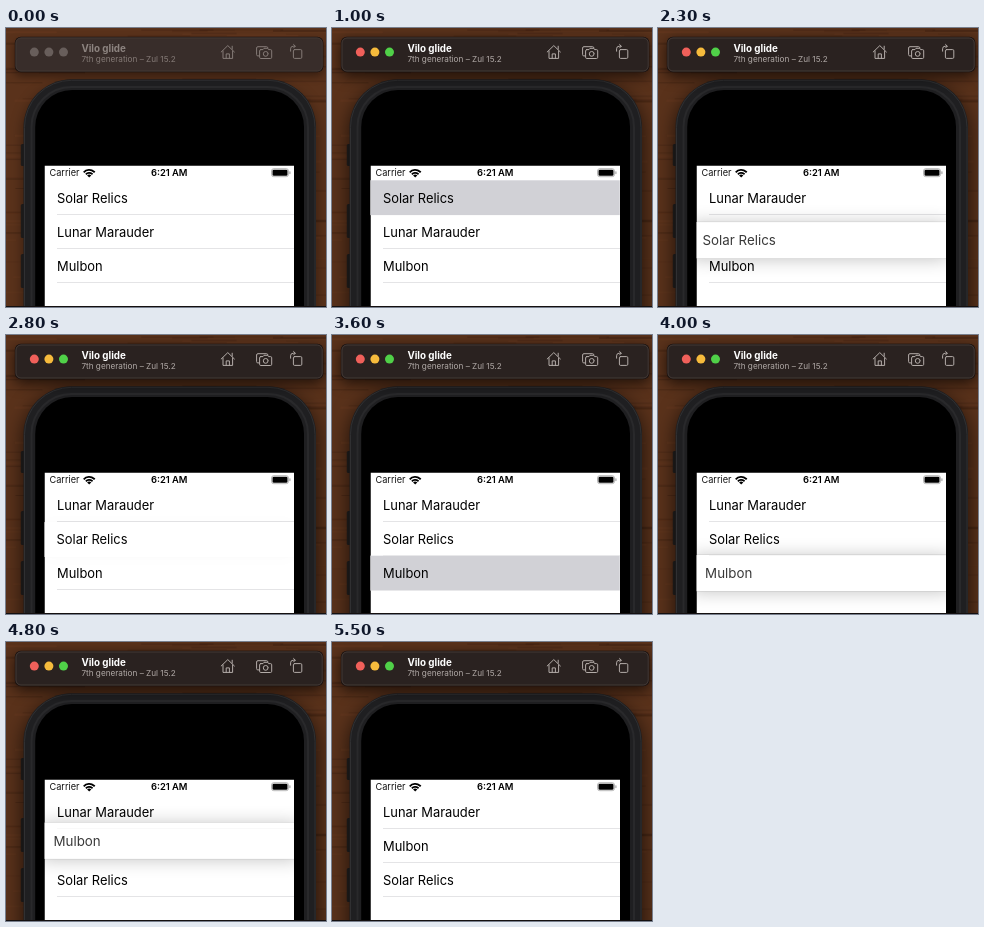
An HTML page with a canvas that plays this animation: 320x279 px, repeating every 6.7 s.

```html
<!DOCTYPE html>
<html lang="en">
<head>
<meta charset="utf-8">
<title>Row reordering</title>
<style>
html, body { margin: 0; width: 100%; height: 100%; overflow: hidden; background: #40240f; }
canvas { display: block; width: 320px; height: 279px; }
</style>
</head>
<body>
<canvas id="stage"></canvas>
<script>
const W = 320, H = 279, LOOP = 6700, STEP = 100;
const canvas = document.getElementById('stage');
const ctx = canvas.getContext('2d');
const dpr = window.devicePixelRatio || 1;
canvas.width = W * dpr;
canvas.height = H * dpr;

const SANS = 'Inter, Roboto, sans-serif';
const SCREEN = { x: 38.5, y: 137.5, w: 249.5, h: 140.5 };
const ROW_TOP = 152.6, ROW_H = 34.2;
const NAMES = ['Solar Relics', 'Lunar Marauder', 'Mulbon'];

// time, dx, dy, lift
const DRAG_DOWN = [
  [1000, 0, 0, 0], [1400, 0, 0, 1], [1500, 0, 0, 1], [1700, -0.6, 11.5, 1],
  [2000, -1.6, 28, 1], [2200, -2.5, 41.5, 1], [2300, -2.6, 42.5, 1], [2900, 0, ROW_H, 0]
];
const DRAG_UP = [
  [3600, 0, 0, 0], [4000, 0, 0, 1], [4100, 0, -4, 1], [4200, 0.1, -14, 1],
  [4300, 0.3, -27, 1], [4400, 0.4, -39, 1], [5000, 0.4, -39.5, 1], [5500, 0, -ROW_H, 0]
];

const clamp = v => Math.max(0, Math.min(1, v));
const smooth = v => v * v * (3 - 2 * v);
const ramp = (t, a, b) => smooth(clamp((t - a) / (b - a)));

function pose(keys, t) {
  let i = 0;
  while (i < keys.length - 2 && t >= keys[i + 1][0]) i++;
  const a = keys[i], b = keys[i + 1];
  let k = clamp((t - a[0]) / (b[0] - a[0]));
  if (a[3] !== b[3]) k = smooth(k);
  const mix = n => a[n] + (b[n] - a[n]) * k;
  return { dx: mix(1), dy: mix(2), lift: mix(3) };
}

function seeded(seed) {
  return () => (seed = (seed * 16807) % 2147483647) / 2147483647;
}

function rect(x, y, w, h, color) {
  ctx.fillStyle = color;
  ctx.fillRect(x, y, w, h);
}

function round(x, y, w, h, r) {
  ctx.beginPath();
  ctx.roundRect(x, y, w, h, r);
}

function fillRound(x, y, w, h, r, color) {
  round(x, y, w, h, r);
  ctx.fillStyle = color;
  ctx.fill();
}

function strokeRound(x, y, w, h, r, color, width = 1) {
  round(x, y, w, h, r);
  ctx.strokeStyle = color;
  ctx.lineWidth = width;
  ctx.stroke();
}

function disc(x, y, r, color) {
  ctx.beginPath();
  ctx.arc(x, y, r, 0, Math.PI * 2);
  ctx.fillStyle = color;
  ctx.fill();
}

function text(str, x, y, size, color, weight = 400, align = 'left') {
  ctx.font = `${weight} ${size}px ${SANS}`;
  ctx.textAlign = align;
  ctx.fillStyle = color;
  ctx.fillText(str, x, y);
}

function shadowed(color, blur, dy, draw) {
  ctx.save();
  ctx.shadowColor = color;
  ctx.shadowBlur = blur * dpr;
  ctx.shadowOffsetY = dy * dpr;
  draw();
  ctx.restore();
}

function wood() {
  rect(0, 0, W, H, '#5a321b');
  const rnd = seeded(77);
  for (let i = 0; i < 170; i++) {
    const x = rnd() * W - 40, y = rnd() * H, w = 20 + rnd() * 90;
    const tone = rnd() < 0.6 ? '38,18,8' : '122,68,38';
    rect(x, y, w, 0.8 + rnd() * 1.6, `rgba(${tone},${0.08 + rnd() * 0.2})`);
  }
}

function phone(active) {
  for (const [y, h] of [[116, 22], [176, 34], [226, 34]]) {
    fillRound(14.8, y, 5, h, 1.5, '#242120');
  }
  shadowed(`rgba(0,0,0,${active ? 0.7 : 0.45})`, active ? 20 : 14, 6, () =>
    fillRound(17.5, 51.3, 292.5, 300, 48, '#1f1f21'));
  strokeRound(18.5, 52.3, 290.5, 300, 47, '#303032');
  strokeRound(25.5, 59, 276.5, 300, 40, '#29292b', 2);
  fillRound(29.2, 62, 268.8, 300, 37, '#000');
}

function icons(color) {
  ctx.save();
  ctx.translate(0, 0.4);
  ctx.strokeStyle = color;
  ctx.lineWidth = 1;
  ctx.lineJoin = 'round';
  ctx.lineCap = 'round';
  // home
  ctx.stroke(new Path2D('M215.2 23.6 L221.8 17.2 L228.4 23.6 M217 22.5 V30 H226.6 V22.5 M220.2 30 V25.5 H223.4 V30 M226.2 20.8 V17.8'));
  // camera
  ctx.stroke(new Path2D('M253 27.5 H251.8 Q250.6 27.5 250.6 26.2 V19.6 Q250.6 18.3 252 18.3 H260.5 Q262 18.3 262 19.8'));
  ctx.stroke(new Path2D('M254.8 21.2 H257 L258 19.9 H261.5 L262.5 21.2 H264.5 Q265.7 21.2 265.7 22.4 V28.9 Q265.7 30.1 264.5 30.1 H254.8 Q253.6 30.1 253.6 28.9 V22.4 Q253.6 21.2 254.8 21.2 Z'));
  ctx.beginPath();
  ctx.arc(259.7, 25.5, 2.4, 0, Math.PI * 2);
  ctx.stroke();
  // rotate
  strokeRound(287.4, 21.2, 8.4, 8.8, 1.2, color);
  ctx.stroke(new Path2D('M284.6 22.8 V20.4 Q284.6 17.8 287.2 17.8 H289 M287.6 16.1 L289.3 17.8 L287.6 19.5'));
  ctx.restore();
}

function toolbar(active) {
  shadowed(`rgba(0,0,0,${active ? 0.65 : 0.4})`, active ? 14 : 8, 4, () =>
    fillRound(8.8, 8.8, 308.6, 35.4, 6, '#1a1210'));
  fillRound(9.5, 9.5, 307.2, 34, 5.5, active ? '#2a2220' : '#382d2a');
  strokeRound(10, 10, 306.2, 33, 5, active ? '#493f3b' : '#453a35', 0.8);
  const lights = active ? ['#f0605a', '#f6bb3c', '#50d148'] : Array(3).fill('#685e5b');
  lights.forEach((c, i) => disc(28.3 + i * 14.6, 24.1, 4.5, c));
  text('Vilo glide', 75.4, 23.7, 9.8, active ? '#fff' : '#8d8480', 700);
  text('7th generation – Zul 15.2', 75.4, 33.6, 8.2, active ? '#b0a9a6' : '#847a76');
  icons(active ? '#b3aca8' : '#857b77');
}

function statusBar() {
  text('Carrier', 43.5, 148.4, 9.2, '#111');
  text('6:21 AM', 163.2, 148.4, 9.4, '#000', 600, 'center');
  ctx.lineCap = 'butt';
  ctx.strokeStyle = '#000';
  ctx.lineWidth = 1.8;
  for (const r of [4.4, 7.3]) {
    ctx.beginPath();
    ctx.arc(83.2, 149.2, r, -Math.PI * 0.77, -Math.PI * 0.23);
    ctx.stroke();
  }
  ctx.beginPath();
  ctx.moveTo(83.2, 149.4);
  ctx.arc(83.2, 149.4, 2.8, -Math.PI * 0.77, -Math.PI * 0.23);
  ctx.fillStyle = '#000';
  ctx.fill();
  strokeRound(265.5, 140.7, 17, 8, 2.3, '#a6a6a6', 0.8);
  fillRound(266.5, 141.7, 15, 6, 1.3, '#000');
  fillRound(283.3, 143.2, 1.2, 3, 0.6, '#a6a6a6');
}

function label(name, mid, color) {
  text(name, 51, mid + 4.8, 12.9, color);
}

function row(name, y) {
  label(name, y + ROW_H / 2, '#000');
  rect(51, Math.round(y + ROW_H - 0.8), 237, 1, '#e4e4e6');
}

function lifted(name, top, p, glow) {
  const s = 1 + 0.035 * p.lift;
  const w = SCREEN.w * s, h = (ROW_H + 0.6) * s;
  const cx = 163 + p.dx, cy = top + ROW_H / 2 + p.dy;
  const x = 163 + p.dx - w / 2, y = cy - h / 2;

  // shadow only outside the cell
  ctx.save();
  ctx.beginPath();
  ctx.rect(0, 0, W, H);
  ctx.rect(x, y, w, h);
  ctx.clip('evenodd');
  shadowed(`rgba(0,0,0,${0.24 * p.lift})`, 18, 1, () => rect(x, y, w, h, '#fff'));
  ctx.strokeStyle = `rgba(0,0,0,${0.16 * p.lift})`;
  ctx.lineWidth = 1;
  ctx.strokeRect(x, y, w, h);
  ctx.restore();

  ctx.save();
  ctx.globalAlpha = 1 - 0.22 * p.lift;
  rect(x, y, w, h, '#fff');
  if (glow > 0) rect(x, y, w, h, `rgba(209,209,214,${glow})`);
  ctx.translate(cx, cy);
  ctx.scale(s, s);
  ctx.translate(-163, 0);
  label(name, 0, '#000');
  ctx.restore();
}

function list(t) {
  const at = i => ROW_TOP + i * ROW_H;
  const first = t >= 1000 && t < 2900;
  const second = t >= 3600 && t < 5500;
  const up = ramp(t, 1800, 2200), down = ramp(t, 4400, 4800);

  if (!first) row(NAMES[0], at(t < 1000 ? 0 : 1 + down));
  row(NAMES[1], at(1 - up));
  if (!second) row(NAMES[2], at(t < 3600 ? 2 : 1));

  if (first) lifted(NAMES[0], at(0), pose(DRAG_DOWN, t), 1 - ramp(t, 1000, 1400));
  if (second) lifted(NAMES[2], at(2), pose(DRAG_UP, t), 1 - ramp(t, 3600, 4000));
}

function draw(t) {
  const active = t >= 800;
  ctx.setTransform(dpr, 0, 0, dpr, 0, 0);
  wood();
  phone(active);
  toolbar(active);
  ctx.save();
  ctx.beginPath();
  ctx.rect(SCREEN.x, SCREEN.y, SCREEN.w, SCREEN.h);
  ctx.clip();
  rect(SCREEN.x, SCREEN.y, SCREEN.w, SCREEN.h, '#fff');
  list(t);
  statusBar();
  ctx.restore();
  rect(0, H - 1, W, 1, '#141010');
}

const start = performance.now();
let last = -1;
function tick() {
  const t = Math.floor(((performance.now() - start) % LOOP) / STEP) * STEP;
  if (t !== last) draw(last = t);
  requestAnimationFrame(tick);
}
tick();
</script>
</body>
</html>
```
